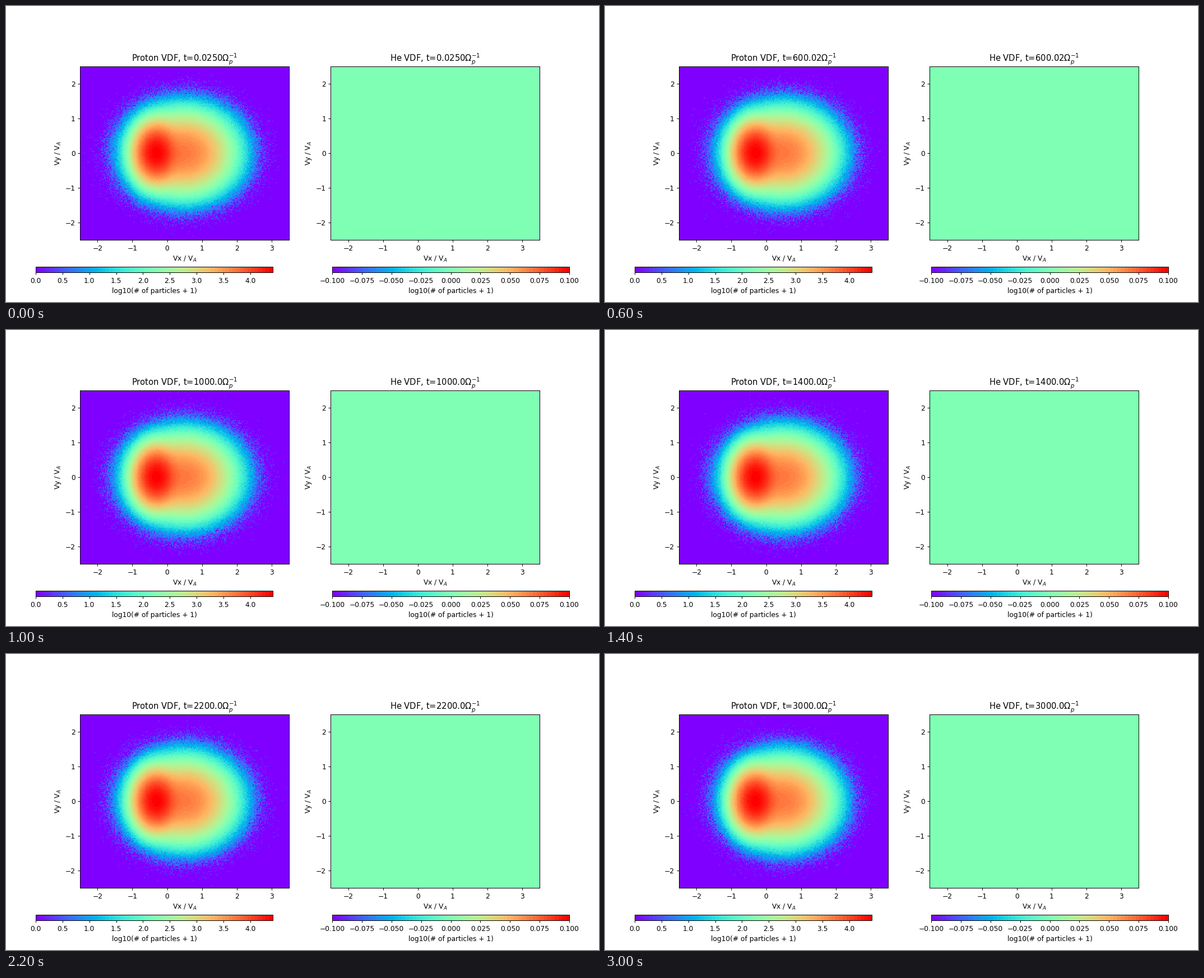
A matplotlib script for the animation above (3200 ms loop, 1058 by 529 pixels).

```python
import numpy as np
import matplotlib.pyplot as plt
from matplotlib.animation import FuncAnimation

DPI = 88.1667
FRAMES, INTERVAL = 16, 200
EXTENT = (-2.5, 3.5, -2.5, 2.5)
BINS = 200
PEAK = 4.42
BAR_LABEL = "log10(# of particles + 1)"

plt.rcParams["font.family"] = "DejaVu Sans"
cmap = plt.get_cmap("rainbow", 65)

vx = EXTENT[0] + 6 * (np.arange(BINS) + 0.5) / BINS
vy = EXTENT[2] + 5 * (np.arange(BINS) + 0.5) / BINS
X, Y = np.meshgrid(vx, vy)


def gauss(height, x0, sx, sy):
    return height * np.exp(-((X - x0) / sx) ** 2 / 2 - (Y / sy) ** 2 / 2)


def proton_map(i):
    """Noisy particle counts: a narrow core and a broad beam."""
    shrink = 0.014 * i / (FRAMES - 1)
    mean = (gauss(23500, -0.32, 0.26, 0.345)
            + gauss(5000, 0.48, 0.56 - shrink, 0.465 - shrink / 3))
    counts = np.random.default_rng(100 + i).poisson(mean)
    return np.log10(counts + 1)


def title_text(species, i):
    t = f"{200 * i + 0.025:.4f}"[:6]
    return rf"{species} VDF, t={t}$\Omega_p^{{-1}}$"


def make_panel(left, bar_left, data, low, high):
    ax = fig.add_axes([left, 1 - 418.4 / 529, 0.775 / 2.2, 310.6 / 529])
    image = ax.imshow(data, extent=EXTENT, origin="lower", cmap=cmap,
                      vmin=low, vmax=high, interpolation="nearest",
                      aspect="auto")
    ax.set_xticks(range(-2, 4))
    ax.set_yticks(range(-2, 3))
    ax.set_xlabel("Vx / V$_A$")
    ax.set_ylabel("Vy / V$_A$")
    bar_ax = fig.add_axes([bar_left, 0.1, 0.4, 0.02])
    fig.colorbar(image, cax=bar_ax, orientation="horizontal", label=BAR_LABEL)
    return ax, image


fig = plt.figure(figsize=(12, 6), dpi=DPI, facecolor="white")
left_ax, proton = make_panel(0.125, 0.05, proton_map(0), 0, PEAK)
right_ax, helium = make_panel(0.125 + 0.93 / 2.2, 0.55,
                              np.zeros((2, 2)), -0.1, 0.1)


def update(i):
    proton.set_data(proton_map(i))
    left_ax.set_title(title_text("Proton", i))
    right_ax.set_title(title_text("He", i))
    return proton, left_ax.title, right_ax.title


anim = FuncAnimation(fig, update, frames=FRAMES, interval=INTERVAL,
                     repeat=True, repeat_delay=0, blit=False)
plt.show()
```
